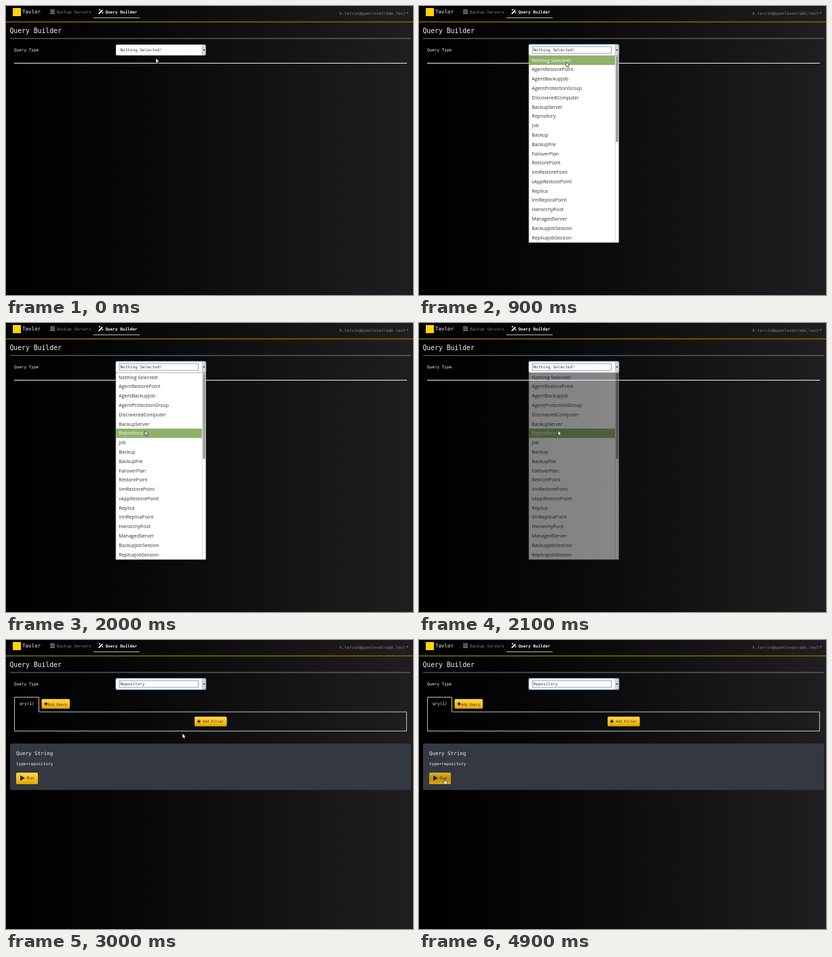
An HTML page that plays this animation: 600x427 px, repeating every 5000 ms.

```html
<!DOCTYPE html>
<html lang="en">
<head>
<meta charset="utf-8">
<title>Query Builder</title>
<style>
  html, body { margin: 0; width: 100%; height: 100%; overflow: hidden; background: #000; }
  svg { display: block; width: 600px; height: 427px; }
  text { font: 6px "DejaVu Sans Mono", monospace; fill: #f4f4f4; white-space: pre; }
  .h1 { font-size: 9.75px; }
  .h2 { font-size: 7.5px; }
  .small { font-size: 5.15px; }
  .dark { fill: #3a3a3a; }
  #list text { font: 7.05px "Open Sans", "Noto Sans", sans-serif; fill: #2e3436; }
  #list text.on { fill: #fff; }
</style>
</head>
<body>
<svg viewBox="0 0 600 427">
  <defs>
    <linearGradient id="page"><stop stop-color="#000"/><stop offset=".25" stop-color="#050505"/><stop offset="1" stop-color="#201e20"/></linearGradient>
    <linearGradient id="rule"><stop stop-color="#3c3c3c"/><stop offset="1" stop-color="#4e4d4e"/></linearGradient>
    <linearGradient id="gold" x2="0" y2="1"><stop stop-color="#ffd84f"/><stop offset=".5" stop-color="#f6c21d"/><stop offset="1" stop-color="#dfa600"/></linearGradient>
    <linearGradient id="pressed" x2="0" y2="1"><stop stop-color="#e3b22a"/><stop offset=".5" stop-color="#c08d08"/><stop offset="1" stop-color="#dca50a"/></linearGradient>
    <path id="plus" d="M-2.6 0H2.6M0 -2.6V2.6" stroke="#222" stroke-width="1.6"/>
  </defs>

  <rect width="600" height="427" fill="url(#page)"/>
  <rect y="22" width="600" height="3" fill="#5c4900" opacity=".45"/>
  <rect y="23" width="600" height="1" fill="#806600"/>

  <rect x="10" y="3" width="12" height="12" fill="#ffd500"/>
  <text class="h2" x="24" y="11">Tavlor</text>
  <path d="M65 6H72M65 8.5H72M65 11H72" stroke="#8b8b8b" stroke-width="1.7"/>
  <text x="75" y="10.6" style="fill:#858585">Backup Servers</text>
  <path d="M136.7 11.6L142.2 6.1" stroke="#fff" stroke-width="1.9"/>
  <path d="M138 4.2V7M136.6 5.6H139.4M142.3 8.8V11M141.2 9.9H143.4" stroke="#fff" stroke-width=".8"/>
  <text x="146.5" y="10.6" font-weight="bold" style="font-weight:bold">Query Builder</text>
  <rect x="129" y="17" width="68" height="1" fill="#b8b8b8"/>
  <text x="491.5" y="12.8" style="fill:#858585">k.tarvin@quenlovatrade.test</text>
  <path d="M590 9.4H593.6L591.8 11.3Z" fill="#858585"/>

  <text class="h1" x="5.5" y="40.3">Query Builder</text>
  <rect x="6" y="47" width="591" height="2" fill="url(#rule)"/>
  <text x="12" y="67">Query Type</text>

  <rect id="glow" x="161.3" y="56" width="134" height="18" rx="2.5" fill="#3f7fb5"/>
  <rect x="162" y="57" width="132.5" height="16" rx="2" fill="#fff"/>
  <rect x="289" y="57.5" width="5" height="15" rx="1" fill="#d8d8d8" stroke="#a5a5a5" stroke-width=".5"/>
  <path d="M290.2 64.3H293.4L291.8 66.3Z" fill="#111"/>
  <rect id="focus" x="167" y="60" width="116.5" height="10" fill="none" stroke="#777" stroke-width=".7"/>
  <text id="before" class="dark" x="168.5" y="67">Nothing Selected!</text>
  <text id="after" class="dark" x="168.5" y="67">Repository</text>

  <rect id="line" x="12" y="84" width="579" height="1" fill="#f0f0f0"/>

  <g id="result">
    <path d="M49 106.2H590.5V134.5H12.5V84.5H48.5V106.2" fill="none" stroke="#d5d5d5" stroke-width=".9"/>
    <text x="20" y="95.7">qry(1)</text>
    <rect x="52.5" y="87.3" width="41.5" height="14.2" rx="1.5" fill="url(#gold)"/>
    <use href="#plus" x="59" y="94.4"/>
    <text class="small dark" x="62" y="96.5">Add Query</text>
    <rect x="278" y="113.3" width="47.5" height="14.2" rx="1.5" fill="url(#gold)"/>
    <use href="#plus" x="284.3" y="120.3"/>
    <text class="small dark" x="290" y="122.4">Add Filter</text>
    <rect x="6" y="153" width="591" height="68.6" fill="#343840"/>
    <text class="h2" x="15" y="170">Query String</text>
    <text x="15" y="185.4">type=repository</text>
    <rect id="run" x="15" y="196" width="32" height="17" rx="1.5"/>
    <path d="M21 200L28 204.1L21 208.2Z" fill="#222"/>
    <text class="dark" x="30.8" y="206.4">Run</text>
  </g>

  <g id="list">
    <rect x="162" y="73.3" width="132.5" height="276" fill="#fff" stroke="#aaa" stroke-width=".7"/>
    <rect id="mark" x="162" width="127" height="13.8" fill="#8fb16b"/>
    <path d="M289.3 73.5V349" stroke="#ccc" stroke-width=".8"/>
    <rect x="290.4" y="74" width="3.2" height="127" rx="1.5" fill="#949494"/>
    <g id="items"></g>
  </g>

  <g id="pointer">
    <path id="arrow" d="M0 0V7.2L1.7 5.7L2.8 8.2L4 7.7L2.9 5.2H5.1Z" fill="#fff" stroke="#111" stroke-width=".6"/>
    <path id="hand" d="M-.7 .3Q0 -.5 .7 .3V2.7L3.6 3.5V5.5L2.9 7.5H-.6L-2.6 4.5L-1.8 3.8L-.7 4.6Z" fill="#fff" stroke="#111" stroke-width=".6"/>
  </g>
</svg>
<script>
const el = id => document.getElementById(id);
const LOOP = 5000, TOP = 73.3, ROW = 13.79;
const names = ("Nothing Selected!,AgentRestorePoint,AgentBackupJob,AgentProtectionGroup,DiscoveredComputer," +
  "BackupServer,Repository,Job,Backup,BackupFile,FailoverPlan,RestorePoint,VmRestorePoint,vAppRestorePoint," +
  "Replica,VmReplicaPoint,HierarchyRoot,ManagedServer,BackupJobSession,ReplicaJobSession").split(",");
el("items").innerHTML = names.map((name, i) =>
  `<text x="166.3" y="${TOP + ROW * i + 9.3}">${name}</text>`).join("");
const items = [...el("items").children];

// pointer stops: time, x, y
const stops = [
  [0, 221, 77], [100, 221, 77], [500, 220, 64.5], [700, 220, 64.5], [1300, 210, 119],
  [1800, 205, 159], [2400, 205, 159], [3000, 260, 138], [4000, 260, 138],
  [4100, 137, 197], [4600, 38, 205.5], [LOOP, 38, 205.5]
];

function pointerAt(t) {
  const i = stops.findIndex(s => s[0] > t);
  const [t0, x0, y0] = stops[i - 1], [t1, x1, y1] = stops[i];
  const k = (t - t0) / (t1 - t0);
  return [x0 + (x1 - x0) * k, y0 + (y1 - y0) * k];
}

const show = (id, opacity) => el(id).setAttribute("opacity", +opacity);

function draw(t) {
  const [x, y] = pointerAt(t);
  const done = t >= 2200, onRun = t >= 4550;
  const open = t < 600 || done ? 0 : t < 700 ? .66 : t < 2100 ? 1 : .5;
  const scale = t < 700 ? .967 : 1;
  const row = Math.max(0, Math.floor((y - TOP) / ROW));

  show("glow", t >= 600);
  show("focus", t >= 600);
  show("before", !done ? 1 : t < 2300 ? .45 : 0);
  show("after", done);
  show("line", !done);
  show("result", done);
  el("run").setAttribute("fill", t >= 4800 ? "url(#pressed)" : "url(#gold)");

  show("list", open);
  el("list").setAttribute("transform", `translate(0 ${TOP * (1 - scale)}) scale(1 ${scale})`);
  el("mark").setAttribute("y", TOP + ROW * row);
  items.forEach((item, i) => item.classList.toggle("on", i === row));

  el("pointer").setAttribute("transform", `translate(${x} ${y})`);
  show("arrow", !onRun);
  show("hand", onRun);
}

const start = performance.now();
function tick() {
  draw((performance.now() - start) % LOOP);
  requestAnimationFrame(tick);
}
tick();
</script>
</body>
</html>
```
